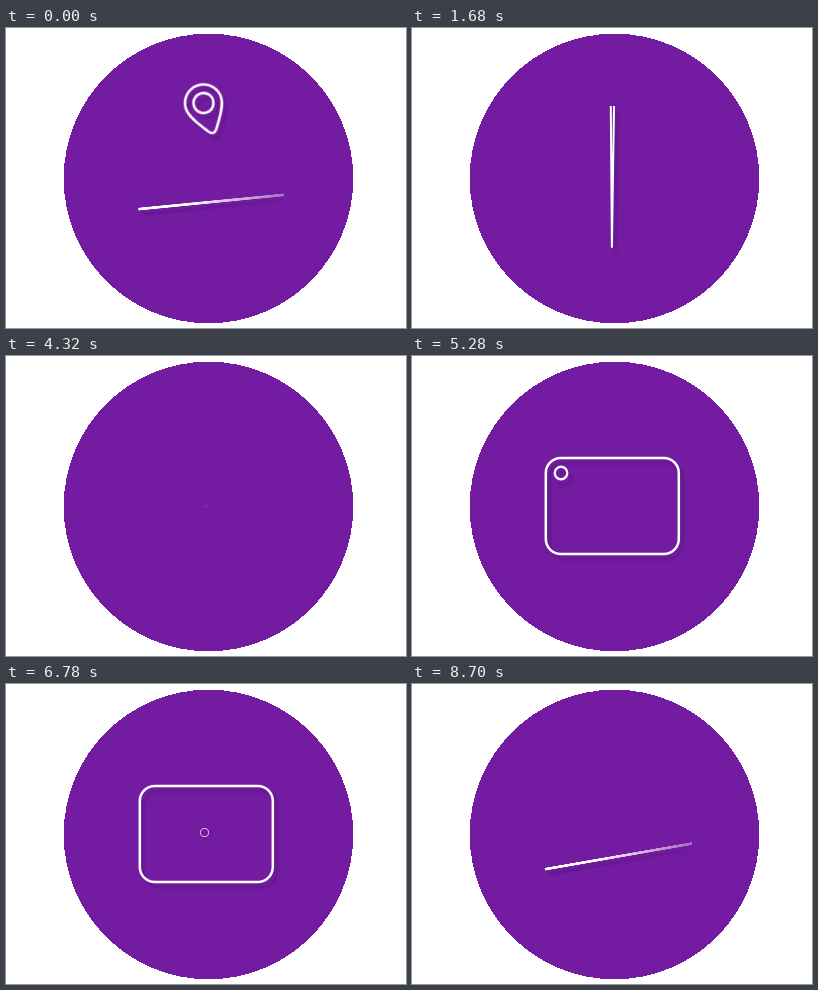
Recreate the animation shown at these times as an HTML page without scripts. Size 400 by 300 pixels, loop 8.76 s.

```html
<!DOCTYPE html>
<html lang="en">
<head>
<meta charset="utf-8">
<title>Travel icons</title>
<style>
html, body { margin: 0; width: 100%; height: 100%; overflow: hidden; background: #fff; }
svg { display: block; width: 100vw; height: 100vh; }

.icons {
  fill: none;
  stroke: #fff;
  stroke-width: 2.5;
  stroke-linejoin: round;
  filter: drop-shadow(4px 5px 1px rgba(50, 10, 90, .28));
}
.icons [class] { animation: 8760ms ease-in-out infinite both; }

.icons .card { transform-origin: 200px 150px; vector-effect: non-scaling-stroke; animation-name: card; }
.icons .pin { animation-name: pin; }
.icons .needle { transform-origin: 200px 150px; stroke-width: 2; animation-name: needle; }
.icons .finder { transform-origin: 149px 117px; stroke-width: 2; animation-name: finder; }
.icons .button { stroke-width: 3; animation-name: button; }
.icons .lens { transform-origin: 200px 150px; stroke-dasharray: 360; animation-name: lens; }
.icons .sun { transform-origin: 164px 130px; stroke-width: 2; animation-name: sun; }
.icons .peaks { stroke-dasharray: 1; animation-name: peaks; }
.rays { stroke-width: 7; stroke-dasharray: .16 .84; stroke-dashoffset: .08; }

/* line under the pin, then camera body, then picture frame, then line again */
@keyframes card {
  0%, .68% { transform: translateY(24.5px) rotate(-5.6deg) scale(1, .002); opacity: 1; }
  1.6% { transform: translateY(25px) rotate(4deg) scale(1, .002); }
  3% { transform: translateY(24px) rotate(-2deg) scale(1, .002); }
  4.6%, 15.5% { transform: translateY(24px) rotate(0deg) scale(1, .002); }
  19.17% { transform: translateY(-1.5px) rotate(-90deg) scale(1.05, .002); opacity: 1; }
  19.18% { transform: scale(.003); opacity: 0; }
  49.31% { transform: scale(.003); opacity: 0; }
  49.32%, 49.9% { transform: scale(.003); opacity: .25; }
  50.6% { opacity: 1; }
  55% { transform: scale(1.05); }
  57%, 93.5% { transform: none; opacity: 1; }
  97.5% { transform: translateY(24px) rotate(-13deg) scale(1, .002); }
  99.32%, 99.99% { transform: translateY(23.5px) rotate(-9.9deg) scale(1, .002); }
  100% { transform: translateY(24.5px) rotate(-5.6deg) scale(1, .002); opacity: 1; }
}
@keyframes pin {
  0%, .68% { transform: translate(197.5px, 75px) rotate(-18deg); }
  1.6% { transform: translate(200px, 140px) rotate(0deg); }
  2.8% { transform: translate(200px, 130px) rotate(4deg); }
  4.2%, 13.5% { transform: translate(200px, 139px) rotate(0deg); }
  16%, 100% { transform: translate(200px, 165px) scale(0); }
}
@keyframes needle {
  0%, 19.17% { transform: none; opacity: 0; }
  19.18%, 19.86% { transform: none; opacity: 1; }
  31% { transform: scale(0); opacity: 1; }
  32%, 100% { transform: scale(0); opacity: 0; }
}
@keyframes finder {
  0%, 57% { transform: scale(0); }
  60% { transform: scale(1.15); }
  61.5%, 73% { transform: none; }
  75.5%, 100% { transform: scale(0); }
}
@keyframes button {
  0%, 62% { transform: translateY(9px); }
  65.5%, 72% { transform: none; }
  74.5%, 100% { transform: translateY(9px); }
}
@keyframes lens {
  0%, 60.5% { stroke-dashoffset: 360; opacity: 0; }
  60.6% { opacity: 1; }
  65.75%, 66.4% { stroke-dashoffset: 63; }
  68.5% { stroke-dashoffset: 0; }
  72.5% { transform: none; stroke-width: 2.5; stroke-dashoffset: 0; }
  77.4%, 78% { transform: translate(-1.5px, -1.5px) scale(.15); stroke-width: 5; stroke-dashoffset: 0; opacity: 1; }
  78.7%, 100% { transform: translate(-2px, -2px) scale(0); stroke-dashoffset: 0; opacity: 0; }
}
@keyframes sun {
  0%, 79% { transform: scale(0) rotate(-90deg); }
  83% { transform: scale(1.1) rotate(0deg); }
  85%, 91.5% { transform: none; }
  94%, 100% { transform: scale(0) rotate(90deg); }
}
@keyframes peaks {
  0%, 81% { stroke-dashoffset: 1; opacity: 0; }
  81.1% { opacity: 1; }
  89.5%, 91% { stroke-dashoffset: 0; opacity: 1; }
  94% { stroke-dashoffset: -1; opacity: 1; }
  94.1%, 100% { stroke-dashoffset: -1; opacity: 0; }
}
</style>
</head>
<body>
<svg viewBox="0 0 400 300">
  <clipPath id="aboveCard"><path d="M230 80h26v21h-26z"/></clipPath>
  <circle cx="202.5" cy="150.5" r="144.8" fill="#741ca1" shape-rendering="crispEdges"/>
  <g class="icons">
    <g clip-path="url(#aboveCard)"><circle class="button" cx="243.3" cy="101.5" r="4.7"/></g>
    <rect class="card" x="133.8" y="102" width="133" height="96" rx="15"/>
    <circle class="finder" cx="149" cy="117" r="5.5"/>
    <path class="lens" pathLength="360" d="M200 123.300a27 27 0 1 0 0 54a27 27 0 1 0 0-54"/>
    <g class="sun">
      <circle cx="164" cy="130" r="8"/>
      <circle cx="164" cy="130" r="16" pathLength="8" style="stroke-width:7;stroke-dasharray:.16 .84;stroke-dashoffset:.08"/>
    </g>
    <path class="peaks" pathLength="1" stroke-linejoin="miter" d="M143 189L168 158L182.500 173L232 123L260.500 183"/>
    <path class="needle" d="M198.800 78L199.900 219L202 78"/>
    <g class="pin">
      <path d="M-18.500 0A18.500 18.500 0 0 1 18.500 0C18.500 10 9 21 4 29Q0 34-4 29C-9 21-18.500 10-18.500 0Z"/>
      <circle r="10"/>
    </g>
  </g>
</svg>
</body>
</html>
```
